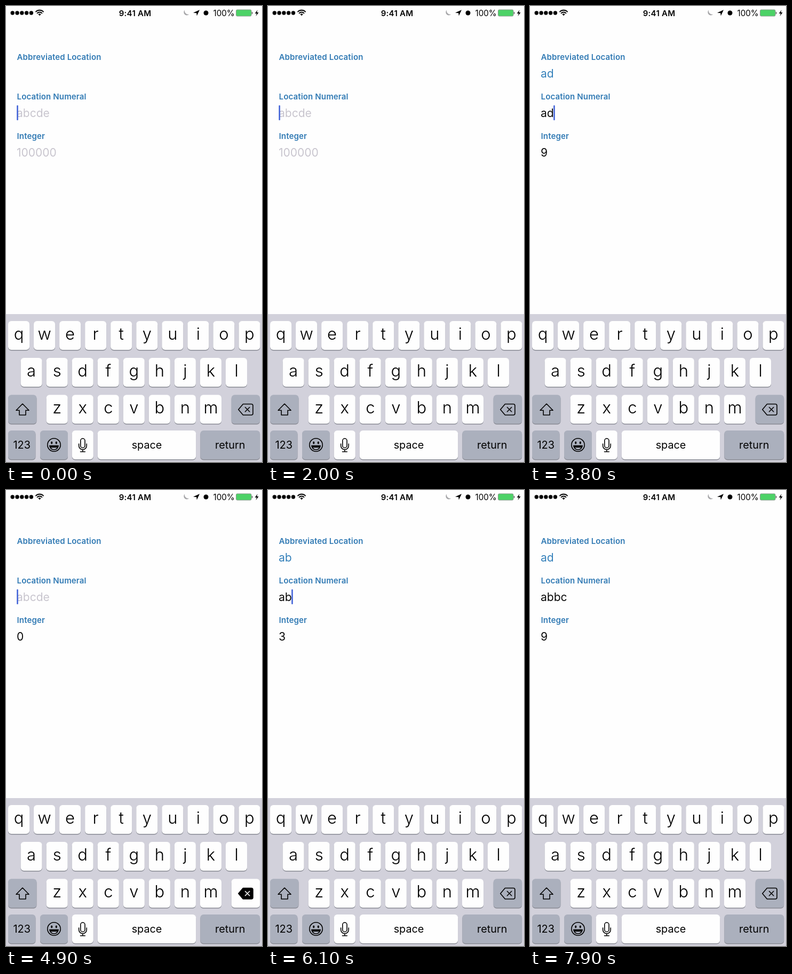
These frames come from a looping animation (480 by 854 pixels, 8 s). An HTML page:

```html
<!DOCTYPE html>
<html lang="en">
<head>
<meta charset="utf-8">
<title>Location numerals</title>
<style>
  html, body { margin: 0; width: 100%; height: 100%; overflow: hidden; background: #fefefe; }
  svg { display: block; width: 480px; height: 854px; font-family: Inter, Roboto, "Liberation Sans", sans-serif; }
  .label { font-size: 15px; font-weight: 600; letter-spacing: .15px; fill: #317ab4; }
  .value { font-size: 21px; }
  .mid { text-anchor: middle; }
  .letter { font-size: 31px; font-weight: 300; }
  .word { font-size: 19.8px; }
  .line { fill: none; stroke: #000; stroke-width: 1.6; stroke-linejoin: round; stroke-linecap: round; }
</style>
</head>
<body>
<svg viewBox="0 0 480 854">
  <rect width="480" height="854" fill="#fefefe"/>

  <g id="status">
    <g id="dots"></g>
    <path d="M63 18.2 60.4 15.4A3.8 3.8 0 0 1 65.6 15.4Z"/>
    <path class="line" stroke-linecap="butt" style="stroke-width:2" d="M58.6 13.4A6.2 6.2 0 0 1 67.4 13.4M56 10.6A10 10 0 0 1 70 10.6"/>
    <text class="mid" x="242" y="18.5" font-size="15" font-weight="600" letter-spacing=".25">9:41 AM</text>
    <path d="M335.2 7.6A5.6 5.6 0 1 0 343.2 15.4A6.4 6.4 0 0 1 335.2 7.6Z" fill="#a5a5a8"/>
    <path d="M363 7.3 357.8 18.6 357.2 13.2 351 12.8Z"/>
    <circle cx="375" cy="13" r="4.5"/>
    <text x="388.5" y="18.6" font-size="15.2">100%</text>
    <rect x="431.5" y="7" width="28.5" height="12" rx="2" fill="#4cd267" stroke="#8f9a92" stroke-width="1"/>
    <path d="M461.3 11Q463 13 461.3 15.2Z" stroke="#555" stroke-width=".8"/>
    <path d="M471.6 7.2 466.8 14H470L468.6 19 473.6 12H470.4Z"/>
  </g>

  <text class="label" x="20.5" y="100.5">Abbreviated Location</text>
  <text class="label" x="20.5" y="174.7">Location Numeral</text>
  <text class="label" x="20.5" y="249">Integer</text>
  <text class="value" id="abbr" x="20" y="133.7" fill="#3480ba"></text>
  <text class="value" id="numeral" x="20" y="208"></text>
  <text class="value" id="integer" x="20" y="282.3"></text>
  <rect id="caret" y="186" width="2.6" height="28" rx="1" fill="#4263d8"/>

  <rect y="577" width="480" height="277" fill="#d2d1db"/>
  <g id="keys"></g>

  <path class="line" d="M31 745 43 757.2H37V766H25V757.2H19Z"/>
  <g id="erase">
    <path class="line" d="M444.5 745.5H460Q463 745.5 463 748.5V763Q463 766 460 766H444.5L435.8 755.8Z"/>
    <path class="line" d="M448.5 751.5 456.7 759.7M456.7 751.5 448.5 759.7"/>
  </g>
  <g id="smile">
    <circle class="line" cx="90" cy="822" r="12.2"/>
    <ellipse cx="85.7" cy="818" rx="1.6" ry="2.4"/>
    <ellipse cx="94.3" cy="818" rx="1.6" ry="2.4"/>
    <path class="line" d="M81.8 823.5H98.2Q96.5 831 90 831T81.8 823.5Z"/>
    <path d="M82.5 824H97.5L96.3 827H83.7Z"/>
  </g>
  <g class="line">
    <rect x="139.8" y="810" width="8.2" height="17.5" rx="4.1"/>
    <path d="M136.6 820V823.5A7.3 7.3 0 0 0 151.2 823.5V820M143.9 831V834.5M139.5 834.8H148.3"/>
  </g>

  <g id="popup">
    <path fill="#fefefe" stroke="#b4b4bd" stroke-width="1"
      d="M-6 -70H46Q53 -70 53 -63V-22C53 -8 40 -10 40 6V48Q40 54 34 54H6Q0 54 0 48V6C0 -10 -13 -8 -13 -22V-63Q-13 -70 -6 -70Z"/>
    <text class="mid" x="20" y="-27" font-size="46" font-weight="300"></text>
  </g>
</svg>

<script>
const LOOP = 8000, STEP = 100;
const $ = id => document.getElementById(id);

function add(parent, tag, attrs, text = '') {
  const el = document.createElementNS('http://www.w3.org/2000/svg', tag);
  for (const name in attrs) el.setAttribute(name, attrs[name]);
  el.textContent = text;
  parent.append(el);
  return el;
}

for (let i = 0; i < 5; i++) add($('dots'), 'circle', { cx: 12.2 + i * 8.8, cy: 13, r: 3.7 });

const GREY = '#abb0bd', WHITE = '#fefefe';
const spots = {};

function addKey(x, y, w, fill, label = '', kind = 'word', base = 34) {
  add($('keys'), 'rect', { x, y: y + 1.5, width: w, height: 54, rx: 6, fill: '#898b94' });
  const face = add($('keys'), 'rect', { x, y, width: w, height: 54, rx: 6, fill });
  if (label) add($('keys'), 'text', { x: x + w / 2, y: y + base, class: 'mid ' + kind }, label);
  return face;
}

[['qwertyuiop', 4, 590], ['asdfghjkl', 27.6, 659], ['zxcvbnm', 75.7, 728.3]].forEach(([row, x0, y]) =>
  [...row].forEach((ch, i) => {
    const x = x0 + i * 48.05;
    spots[ch] = [x, y];
    addKey(x, y, 40, WHITE, ch, 'letter', 35);
  }));
addKey(4, 728.3, 53.5, GREY);
const eraseKey = addKey(422.7, 728.3, 53.5, GREY);
addKey(4, 795, 51.5, GREY, '123');
addKey(64, 795, 52, GREY);
addKey(123.8, 795, 40, WHITE);
addKey(171.8, 795, 184.4, WHITE, 'space');
addKey(364.3, 795, 111.9, GREY, 'return');

// Tables of [start time, value]
const typed = [[0, null], [2600, 'a'], [3400, 'ad'], [4700, 'a'], [4900, ''], [5500, 'a'],
  [6100, 'ab'], [6500, 'abb'], [6900, 'abbc']];
const pressed = [[0, ''], [2500, 'a'], [2600, ''], [3300, 'd'], [3400, ''], [4700, 'erase'], [4800, ''],
  [4900, 'erase'], [5000, ''], [5400, 'a'], [5500, ''], [6000, 'b'], [6100, ''], [6400, 'b'], [6500, ''],
  [6800, 'c'], [6900, '']];
const blink = [[0, 1], [400, 0], [500, 0], [900, 1], [1000, 1], [1400, 0], [1600, 0], [2000, 1], [2100, 1],
  [2500, 0], [2600, 1], [3800, 1], [4200, 0], [4300, 0], [4700, 1], [7300, 1], [7700, 0], [LOOP, 0]];

const at = (table, t) => table.filter(row => row[0] <= t).pop()[1];

function ease(table, t) {
  const i = table.findIndex(row => row[0] > t);
  const [[t0, a], [t1, b]] = [table[i - 1], table[i]];
  return a + (b - a) * (t - t0) / (t1 - t0);
}

// Each letter stands for a power of two
const sum = text => [...text].reduce((n, ch) => n + 2 ** (ch.charCodeAt(0) - 97), 0);
const shorten = n => [...'abcdefgh'].filter((ch, i) => n >> i & 1).join('');

function show(el, text, hint) {
  el.textContent = text || hint;
  el.setAttribute('fill', text ? '#080808' : '#c8c5ce');
}

function draw(t) {
  const text = at(typed, t), key = at(pressed, t), value = sum(text || '');
  $('abbr').textContent = shorten(value);
  show($('numeral'), text, 'abcde');
  show($('integer'), text === null ? '' : String(value), '100000');

  const width = text ? $('numeral').getComputedTextLength() : 0;
  $('caret').setAttribute('x', 20.2 + Math.max(0, width - .8));
  $('caret').setAttribute('opacity', ease(blink, t));

  const erasing = key === 'erase';
  eraseKey.setAttribute('fill', erasing ? WHITE : GREY);
  const [shape, cross] = $('erase').children;
  shape.style.fill = erasing ? '#000' : 'none';
  cross.style.stroke = erasing ? '#fff' : '#000';

  const spot = spots[key];
  $('popup').style.display = spot ? '' : 'none';
  if (spot) {
    $('popup').setAttribute('transform', `translate(${spot})`);
    $('popup').lastElementChild.textContent = key;
  }
}

const start = performance.now();
function tick() {
  const t = (performance.now() - start) % LOOP;
  draw(Math.floor(t / STEP) * STEP);
  requestAnimationFrame(tick);
}
tick();
</script>
</body>
</html>
```
